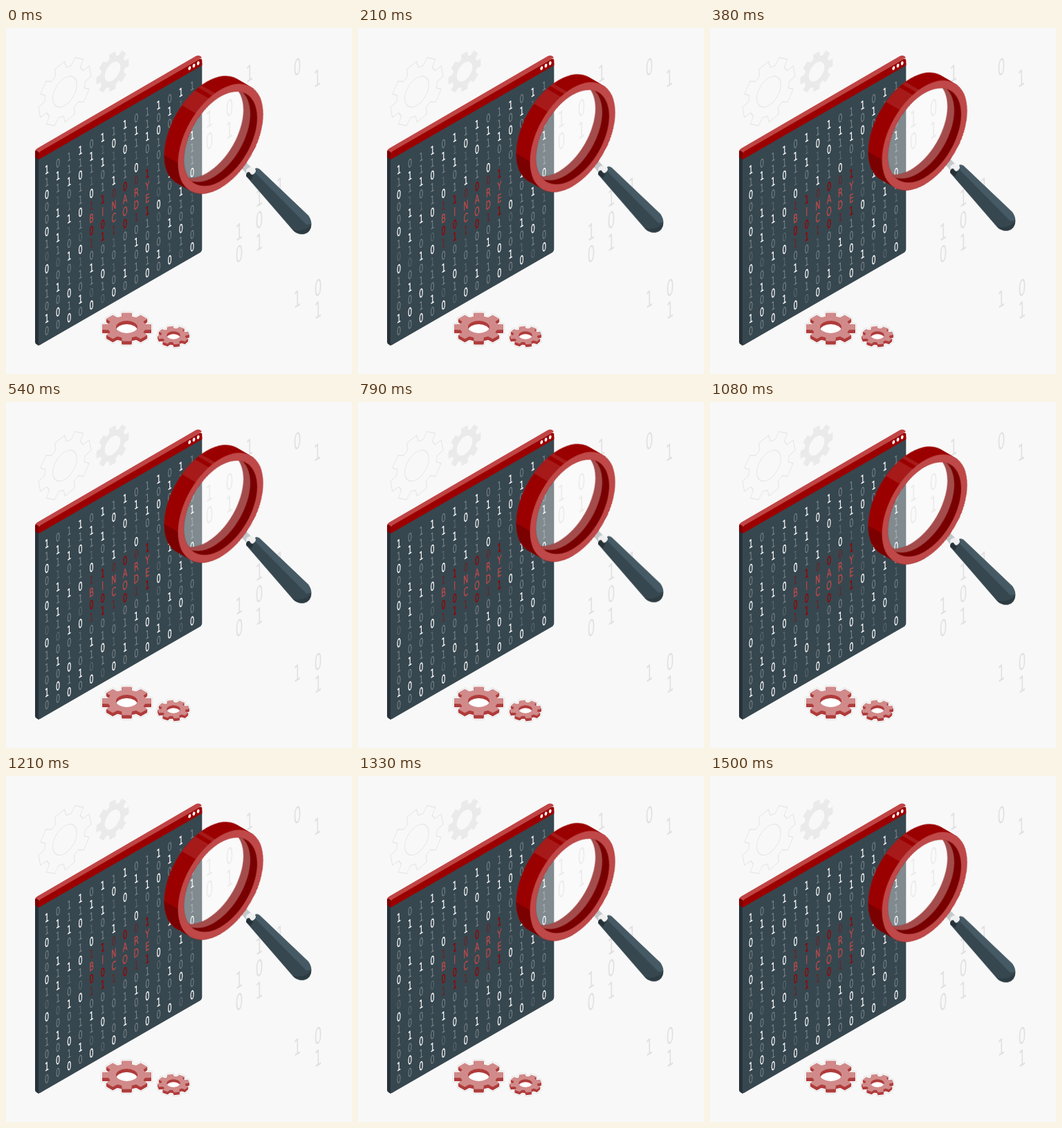
An HTML page for the animation above (1.54 s loop, 500 px wide and 500 px high).

```html
<!DOCTYPE html>
<html lang="en">
<head>
<meta charset="utf-8">
<title>Binary code</title>
<style>
  html, body { margin: 0; width: 100%; height: 100%; overflow: hidden; background: #f8f8f8; }
  svg { display: block; width: 100vw; height: 100vh; }
  text { font-family: "DejaVu Sans", sans-serif; text-anchor: middle; }
  #code { font-size: 16.5px; stroke-width: .35; }
  #code .lit { fill: #fff; stroke: #fff; }
  #code .dim { fill: #fff; opacity: .34; }
  #code .faint { fill: #fff; opacity: .18; }
  #code .red { fill: #9b0000; stroke: #9b0000; }
  #code .deep { fill: #9b0000; opacity: .55; }
  #code .word { fill: #c24a4a; stroke: #c24a4a; }
  #bits { font-size: 32px; fill: #e1e1e1; }
  #lens { animation: bob 770ms cubic-bezier(.3, .1, .7, .9) -40ms infinite alternate; }
  @keyframes bob {
    from { transform: translateY(.3px); }
    to { transform: translateY(-8.9px); }
  }
</style>
</head>
<body>
<svg viewBox="0 0 500 500">
  <defs>
    <clipPath id="front"><ellipse rx="43.2" ry="74.8"/></clipPath>
    <clipPath id="side">
      <path d="M0-87H-23A50.2 87 0 0 0-23 87H0A50.2 87 0 0 0 0-87Z"/>
    </clipPath>
    <mask id="hole" maskUnits="userSpaceOnUse" x="-90" y="-100" width="160" height="200">
      <rect x="-90" y="-100" width="160" height="200" fill="#fff"/>
      <ellipse cx="-23" rx="43.2" ry="74.8" clip-path="url(#front)"/>
    </mask>
  </defs>

  <g id="bits"></g>
  <g id="gears"></g>

  <!-- window -->
  <path fill="#263238" d="M42 186V453.500Q42 456 44 457L47 459L52 456V180Z"/>
  <path fill="#37474f" d="M47 186L283.300 50V319Q283.300 323 279.800 325L50 457.500Q47 459 47 456Z"/>
  <g transform="translate(0 -1.200)">
    <path fill="#c04545" d="M42 180Q42 177 45 175.300L274 42Q278 39.800 281.500 42.300L283 44L48 181Z"/>
    <path fill="#7d0000" d="M42 179.500Q42.300 178 44 178.500L48 181V191.500L42 188Z"/>
    <path fill="#9b0000" d="M47 191.500V184Q47 181 50 179.200L278.800 46.500Q283.300 44 283.300 48.500V55.300Z"/>
  </g>
  <g fill="#fff">
    <ellipse cx="265.300" cy="58" rx="1.800" ry="2.900" transform="rotate(18 265.300 58)"/>
    <ellipse cx="271.500" cy="54.400" rx="1.800" ry="2.900" transform="rotate(18 271.500 54.400)"/>
    <ellipse cx="277.700" cy="50.900" rx="1.800" ry="2.900" transform="rotate(18 277.700 50.900)"/>
  </g>
  <g id="code"></g>

  <g id="lens">
    <!-- handle -->
    <path fill="#c3c8ca" d="M338 199L346 193L358 205L349 213Z"/>
    <path fill="#f0f0f0" d="M347 205Q350 201 354 201Q360 203 361.500 208L353 217Q347 213 347 205Z"/>
    <path fill="#37474f" d="M347 214Q347 207.500 352 208.500Q355 215 360 209Q362 206 360 203Q363.500 201.500 366.500 204L437 271Q441.300 277 441.300 284Q440.500 295 431 297.500Q421.500 299 414.500 292Z"/>
    <path fill="#455a64" d="M360 203Q363.500 201.500 366.500 204L437 271Q441 277 441.300 283L434 284L361 210Q362 206 360 203Z"/>
    <path fill="#263238" d="M347 214Q347 207.500 352 208.500Q354 213 358 212L354 219Z"/>
    <path fill="#2d3b42" d="M441.300 284Q440.500 295 431 297.500Q421.500 299 414.500 292Q433 295 441.300 284Z"/>

    <g transform="translate(310 160) rotate(30)">
      <!-- glass -->
      <g clip-path="url(#front)">
        <ellipse cx="-23" rx="43.200" ry="74.800" fill="#fff" opacity=".36"/>
      </g>
      <!-- ring -->
      <g mask="url(#hole)">
        <g clip-path="url(#side)">
          <rect x="-80" y="-90" width="140" height="180" fill="#9b0000"/>
          <rect x="-80" y="-42" width="140" height="28" fill="#a61a1a"/>
          <rect x="-80" y="-53" width="140" height="5" fill="#a61a1a"/>
          <rect x="-80" y="61" width="140" height="30" fill="#7b0000"/>
        </g>
        <ellipse rx="44" ry="76" fill="#780000"/>
        <g clip-path="url(#front)">
          <ellipse cx="-11.500" rx="43.200" ry="74.800" fill="#a44c4c"/>
        </g>
      </g>
      <path fill="#bf4848" fill-rule="evenodd" d="M0-87A50.200 87 0 0 1 0 87A50.200 87 0 0 1 0-87ZM0-74.800A43.200 74.800 0 0 0 0 74.800A43.200 74.800 0 0 0 0-74.800Z"/>
    </g>
  </g>
</svg>
<script>
const NS = 'http://www.w3.org/2000/svg';
const $ = id => document.getElementById(id);

function add(parent, tag, attrs, text) {
  const el = document.createElementNS(NS, tag);
  for (const k in attrs) el.setAttribute(k, attrs[k]);
  if (text) el.textContent = text;
  parent.append(el);
  return el;
}

// one glyph on the left-hand isometric plane, centred at x, y
function glyph(parent, ch, x, y, size, sx, cls) {
  const transform = `matrix(${sx} ${-sx * .577} 0 1 ${x} ${y})`;
  add(parent, 'text', { transform, y: size * .365, class: cls }, ch);
}

// digits: 0/1 bright, o/i dim, x/y red, u/v deep red; capitals spell the words
const columns = [
  '1i0oo0io0iio1o', 'o1ii1i1ioo1o0o', 'ii1oi1io1oi0i0', '1i0ii0io0iio1o',
  'o1ii0vBxvo1io0', '1i1oiyIxyoi0io', 'i0ii1uNCvioio0', '1i0iixAOxoii1o',
  'o1ii0uRDvo1oio', 'ii1oiyYEyio0i0', '1o0ioiio0oio1o', 'o1oioi1oio1oi0',
  '1ioiioio1io0io', 'ioio1ii0oioio0'
];
const digits = { o: '0', x: '0', u: '0', i: '1', y: '1', v: '1' };

function tone(ch, c, r) {
  if (/[01]/.test(ch)) return 'lit';
  if (/[xy]/.test(ch)) return 'red';
  if (/[uv]/.test(ch)) return 'deep';
  if (/[A-Z]/.test(ch)) return 'word';
  return (c * 5 + r * 3) % 7 < 2 ? 'faint' : 'dim';
}

columns.forEach((col, c) => [...col].forEach((ch, r) =>
  glyph($('code'), digits[ch] || ch, 59 + c * 16.15, 204.5 + r * 17.92 - c * 9.32, 16.5, .58, tone(ch, c, r))));

const bits = [
  [1, 352, 65], [0, 421, 56], [1, 450, 72], [0, 323, 115], [1, 294, 131], [0, 294, 163],
  [1, 323, 147], [1, 396, 228], [1, 366, 245], [0, 366, 277], [1, 366, 309], [1, 337, 294],
  [0, 337, 326], [1, 421, 391], [0, 451, 375], [1, 451, 407]
];
for (const [d, x, y] of bits) glyph($('bits'), String(d), x, y, 32, .54, '');

function gearPath(outer, root, hole, turn) {
  const pts = [];
  for (let i = 0; i < 8; i++) {
    const a = i * Math.PI / 4 + turn;
    for (const [da, r] of [[-.27, root], [-.19, outer], [.19, outer], [.27, root]])
      pts.push(`${(r * Math.cos(a + da)).toFixed(2)} ${(r * Math.sin(a + da)).toFixed(2)}`);
  }
  return `M${pts.join('L')}ZM${hole} 0A${hole} ${hole} 0 1 0 ${-hole} 0A${hole} ${hole} 0 1 0 ${hole} 0Z`;
}

const wall = (x, y) => `matrix(.866 -.5 0 1 ${x} ${y})`;
add($('gears'), 'path', {
  d: gearPath(44, 34, 20, -.2), transform: wall(85, 92),
  fill: 'none', stroke: '#e6e6e6', 'stroke-width': 1.2, 'stroke-linejoin': 'round'
});
add($('gears'), 'path', {
  d: gearPath(27.5, 21, 13, 0), transform: wall(154, 63), fill: '#eaeaea', 'fill-rule': 'evenodd'
});

function floorGear(x, y, outer, root, hole, depth, turn) {
  const d = gearPath(outer, root, hole, turn);
  const layer = (dy, fill, width = 0) => add($('gears'), 'path', {
    d, fill, stroke: width ? fill : 'none', 'stroke-width': width, 'stroke-linejoin': 'round',
    'vector-effect': 'non-scaling-stroke', 'fill-rule': width ? 'nonzero' : 'evenodd',
    transform: `translate(${x} ${y + dy}) scale(1 .577)`
  });
  for (const [fill, width] of [['#dcdcdc', 4], ['#fff', 2.5]]) {
    layer(0, fill, width);
    layer(depth, fill, width);
    add($('gears'), 'ellipse', { cx: x, cy: y + 2, rx: hole + 2, ry: hole * .577 + 1, fill: '#fff' });
  }
  for (let dy = depth; dy > 0; dy -= .5) layer(dy, '#b03c3c');
  layer(0, '#d18a8a');
}
floorGear(174.5, 432, 36, 27.5, 15.5, 5, 0);
floorGear(242, 444, 23, 17.5, 9.8, 4, -.22);
</script>
</body>
</html>
```
